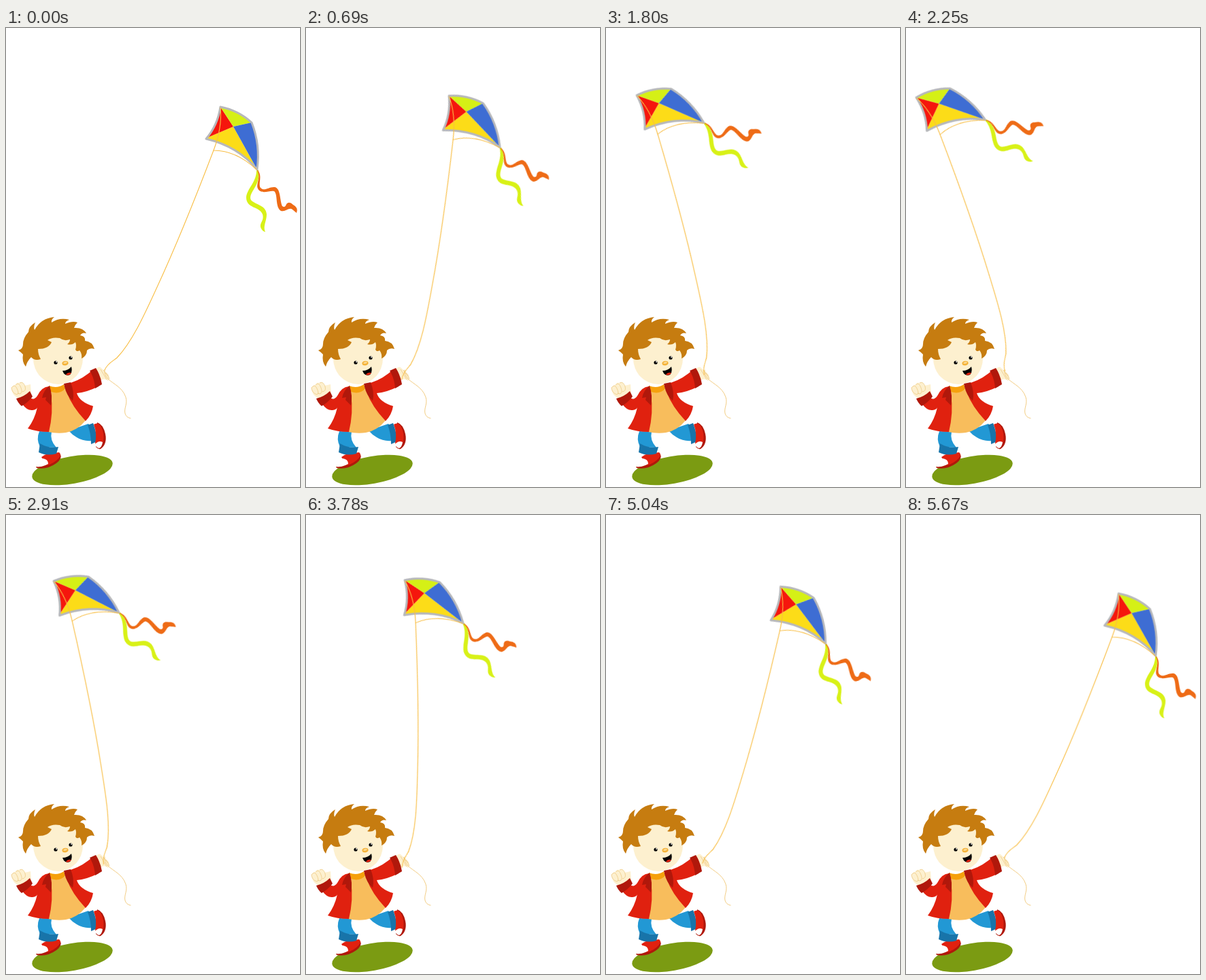
Recreate the animation shown at these times as an HTML page. Size 432 px wide and 675 px high, loop 5700 ms.

```html
<!DOCTYPE html>
<html lang="en">
<head>
<meta charset="utf-8">
<title>Boy with a kite</title>
<style>
  html, body { margin: 0; width: 100%; height: 100%; overflow: hidden; background: #fff; }
  svg { display: block; width: 432px; height: 675px; }

  /* Kite and string turn about their common middle while it slides in a
     straight line, in 30 ms steps. The tiny negative delay keeps step
     boundaries clear of rounding. */
  .kite {
    transform-origin: 286px 314px;
    animation: swing 5700ms -2ms infinite;
  }
  @keyframes swing {
    0% { transform: translate(0, 0) rotate(0deg); animation-timing-function: steps(70); }
    36.8421% { transform: translate(-168px, -46.6px) rotate(-43.5deg); animation-timing-function: steps(120); }
    100% { transform: translate(0, 0) rotate(0deg); }
  }

  .red { fill: #e0210f; }
  .dark-red { fill: #b0180b; }
  .skin { fill: #fdf0cf; }
  .blue { fill: #2298d4; }
  .dark-blue { fill: #1874a9; }
  .white { fill: #fff; }
  .crease { fill: none; stroke: #eecb86; stroke-width: .8; }
  .string { fill: none; stroke: #f8be45; stroke-width: 1.1; stroke-linecap: round; }
  .loose { stroke: #f3cd83; stroke-width: 1; }
</style>
</head>
<body>
<svg viewBox="0 0 432 675">
  <ellipse cx="97.5" cy="650" rx="60" ry="20" transform="rotate(-10 97.5 650)" fill="#7b9b12"/>

  <g id="legs">
    <path class="blue" d="M92 592L121 582Q124 584 126 607Q113 608 104 602Q97 598 92 592Z"/>
    <path class="dark-blue" d="M120 584L128 581Q133 594 134 608L125 612Q125 596 120 584Z"/>
    <path class="dark-red" d="M134 580Q143 583 146 597Q149 612 139 619Q135 620 132 616Z"/>
    <path class="red" d="M129 583Q135 579 139 585Q145 596 143 608L138 614L131 611Q134 596 129 583Z"/>
    <path class="white" d="M131 612Q136 606 142 609Q141 616 137 618Q132 617 131 612Z"/>
    <path class="blue" d="M49 593L67 594Q64 606 74 617L50 616Q44 605 49 593Z"/>
    <path class="dark-red" d="M44 645Q58 647 80 627Q83 633 74 640Q60 650 45 647Z"/>
    <path class="red" d="M52 631Q57 627 62 626L78 624Q82 627 78 632Q70 641 60 643Z"/>
    <path class="white" d="M45 642Q47 635 54 633Q62 634 62 641Q54 646 45 645Z"/>
    <path class="dark-blue" d="M50 611Q63 619 77 616L74 626Q60 630 48 624Z"/>
  </g>

  <g id="clothes">
    <path class="skin" d="M8 529Q10 525 14 525Q16 520 20 522Q25 519 27 526L36 524L37 538L19 545Q8 540 8 529Z"/>
    <path class="crease" d="M8 529Q13 523 16 530Q20 538 16 539Q9 537 8 529M14 525Q19 520 22 529Q25 537 20 538L17 537M20 522Q25 519 28 527Q30 534 24 535"/>
    <path class="skin" d="M131 503Q137 495 141 501L151 510Q153 516 150 519Q145 514 139 518Z"/>
    <path class="crease" d="M139 502L148 517M143 503L150 512M147 507L152 516"/>
    <path fill="#f8bd5c" d="M64 530Q77 538 88 531Q101 555 117 577Q105 592 88 595Q76 597 62 594Z"/>
    <path fill="#f5a00d" d="M63 526Q75 531 85 524L87 531Q77 540 64 534Z"/>
    <path class="red" d="M63 527Q52 528 46 541Q41 548 36 544L24 553Q31 563 39 562Q45 561 46 558Q42 576 32 589Q46 594 63 594Q70 565 66 539Z"/>
    <path class="red" d="M86 524Q108 520 126 504L136 527Q118 536 104 537Q108 550 128 556Q126 569 117 578Q97 557 89 535Z"/>
    <path class="dark-red" d="M64 526Q55 533 53 544L59 543L58 547L66 555Q69 541 64 526Z"/>
    <path class="dark-red" d="M85 523L95 521Q101 536 98 548L93 543Q87 535 85 523Z"/>
    <path class="dark-red" d="M15 545Q27 542 35 534L39 542Q32 551 23 556Q18 552 15 545Z"/>
    <path class="dark-red" d="M123 504L132 500Q139 511 141 524L131 530Q130 515 123 504Z"/>
  </g>

  <g id="head">
    <ellipse class="skin" cx="76.5" cy="486" rx="36.5" ry="38"/>
    <path fill="#c67c10" d="M29 498Q23 491 25 480Q21 476 18 474Q25 472 25 465
      Q25 456 33 447Q33 439 43 433Q40 440 42 444Q51 427 71 425
      Q66 429 67 433Q79 425 93 429Q87 431 87 435Q98 430 105 433
      Q101 437 100 441Q113 440 118 449Q112 447 109 452
      Q117 453 116 460Q127 461 130 472Q123 470 119 474
      Q119 482 111 486Q112 479 108 474Q104 477 102 473Q104 467 102 462
      Q97 467 90 465Q94 462 94 458Q85 461 79 456
      Q68 454 61 459L67 462Q63 472 47 472Q47 480 51 487
      Q42 490 37 484Q31 490 29 498Z"/>
    <circle cx="73" cy="492" r="2.6"/>
    <circle cx="95" cy="485" r="2.6"/>
    <circle class="white" cx="74" cy="491" r=".9"/>
    <circle class="white" cx="96" cy="484" r=".9"/>
    <ellipse cx="87" cy="493" rx="4.6" ry="3.2" transform="rotate(-12 87 493)" fill="#f4b236"/>
    <ellipse cx="87" cy="492.3" rx="2.8" ry="1.4" transform="rotate(-12 87 492.3)" fill="#fbd994"/>
    <path d="M83 504Q91 504 96 498Q98 506 94 510Q86 513 83 504Z"/>
    <path class="red" d="M88 510Q90 506 96 507Q93 512 88 510Z"/>
  </g>

  <path class="string loose" d="M145 503Q144 510 150 516C158 524 171 528 176 543C179 553 173 559 175 567Q177 573 183 574"/>

  <g class="kite">
    <path fill="#d8f117" d="M368 208C369 226 354 236 353 249C353 266 373 262 377 274
      C380 284 371 287 375 295Q377 299 381 300C377 292 383 284 383 274
      C382 260 366 260 360 253C355 242 375 232 371 209Z"/>
    <path fill="#ee6b16" d="M368 208C376 219 367 228 370 236C375 246 388 238 394 240
      C400 245 395 263 404 269C411 271 416 263 421 267L427 272
      Q430 264 422 260Q416 254 412 259Q410 265 406 262C402 254 404 236 395 234
      C386 233 380 241 374 235C370 228 378 218 369 208Z"/>
    <path fill="#fcdc18" d="M334 145L294 162Q341 174 369 208Z"/>
    <path fill="#f5160d" d="M315 116L334 145L294 162Q311 143 315 116Z"/>
    <path fill="#d5f016" d="M315 116Q341 121 361 139L334 145Z"/>
    <path fill="#3e6dd3" d="M361 139Q374 172 369 208L334 145Z"/>
    <path fill="none" stroke="#b7b8bb" stroke-width="3" stroke-linejoin="round"
      d="M315 116Q341 121 361 139Q374 172 369 208Q341 174 294 163Q311 143 315 116Z"/>
    <path class="string" d="M315 117Q318 146 305 180Q338 180 368 208"/>
    <path class="string" d="M305 180C270 272 240 342 222 381C205 418 186 461 163 485C157 490 149 493 145 503"/>
  </g>
</svg>
</body>
</html>
```
